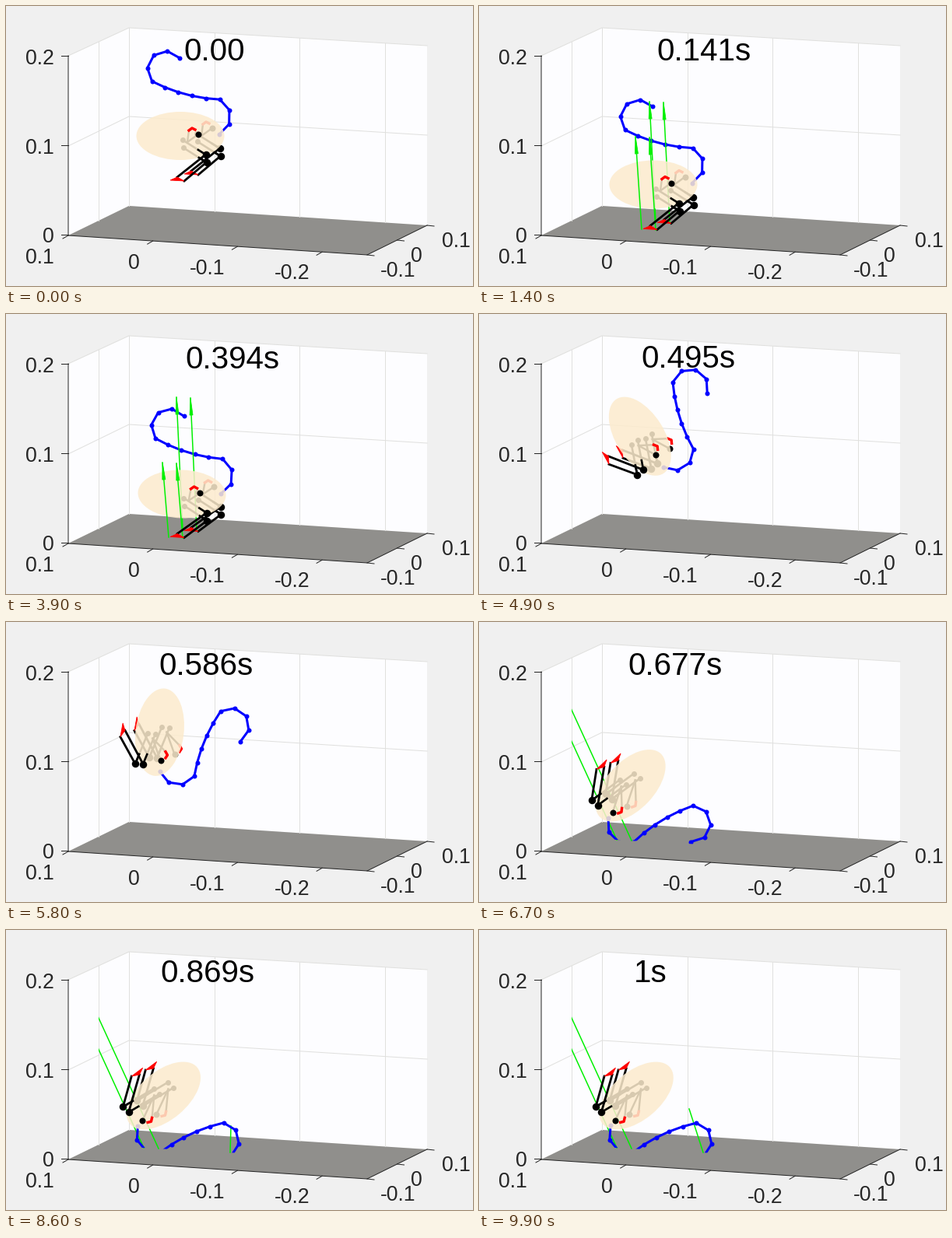
These frames come from a looping animation (600 by 360 pixels, 10000 ms). A matplotlib script:

```python
import numpy as np
import matplotlib.pyplot as plt
from matplotlib.animation import FuncAnimation
from matplotlib.patches import Ellipse, Polygon

W, H, DPI = 600, 360, 72
FRAMES = 100
PAPER, WALL, FLOOR = "#f0f0f0", "#fdfdff", "#908f8c"
GRID, INK, SKIN, FORCE = "#e0e0de", "#262626", "#fcebcd", "#00f000"

LAND, PUSH, LEAP, CRASH = 11, 39, 44, 66   # phases of the jump
GROUND = np.array([221, 285.5])            # planted near foot
FAR = np.array([18, -8])                   # far limbs seen from the camera

fig = plt.figure(figsize=(W / DPI, H / DPI), dpi=DPI, facecolor=PAPER)
ax = fig.add_axes([0, 0, 1, 1])
ax.set_xlim(0, W)
ax.set_ylim(H, 0)
ax.axis("off")


def label(x, y, s, size=26.6, ha="right", color=INK):
    return ax.text(x, y, s, fontsize=size, family="Liberation Sans",
                   color=color, ha=ha, va="baseline", zorder=9)


def rule(pts, color=GRID):
    ax.plot(*zip(*pts), color=color, lw=1, zorder=2)


def tick(x, y, dx, dy):
    rule([(x, y), (x + dx, y + dy)], INK)


def draw_box():
    fl, bl, br, fr = (80, 295), (158, 257), (541, 282), (464, 320)
    tl, tb, tr = (80, 64), (158, 28), (541, 51)
    for pts, color in (((fl, bl, tb, tl), WALL), ((bl, br, tr, tb), WALL),
                       ((fl, bl, br, fr), FLOOR)):
        ax.add_patch(Polygon(pts, fc=color, ec="none", zorder=1))
    rule([tl, tb, tr])
    rule([tb, bl])
    rule([(80, 180), (158, 142), (541, 166)])
    rule([(119, 46), (119, 276)])
    for k in (1, 2, 3):
        x = 158 + 109.7 * k
        rule([(x, 28 + 6.6 * k), (x, 257 + 7.1 * k)])
    rule([tl, fl, fr, br], INK)
    for k, s in enumerate(("0.2", "0.1", "0")):
        tick(80, 64 + 115 * k, -9, 0)
        label(62, 75 + 114.5 * k, s)
    for k, s in enumerate(("0.1", "0", "-0.1", "-0.2")):
        tick(80 + 108.7 * k, 295 + 7.1 * k, -7, 4)
        label(61.5 + 109.8 * k, 331 + 6.8 * k, s)
    for k, s in enumerate(("-0.1", "0", "0.1")):
        tick(464 + 38.5 * k, 320 - 19 * k, 9, 1)
        label(481 + 39.3 * k, 348 - 19 * k, s, ha="left")


def ramp(i, start, end):
    return np.clip((i - start) / (end - start), 0, 1)


def rotate(pts, deg):
    a = np.radians(deg)
    c, s = np.cos(a), np.sin(a)
    return np.asarray(pts, float) @ np.array([[c, s], [-s, c]])


def angle(i):
    """Slow lean, quick push, steady spin, then settling."""
    if i < LEAP:
        return 2 * ramp(i, 14, PUSH) + 34 * ramp(i, PUSH, LEAP) ** 2
    if i < CRASH:
        return 36 + 96 * ramp(i, LEAP, CRASH)
    return 140 - 8 * np.exp(-(i - CRASH) / 5)


def center(i):
    """Free fall, crouch and push, ballistic arc, then rest."""
    push = ramp(i, PUSH, LEAP) ** 2
    x = 224 + 2 * ramp(i, 14, PUSH) - 9 * push
    y = min(167 + 0.575 * i * i, 229.5) + 2 * ramp(i, 14, PUSH) - 26 * push
    if i >= LEAP:
        x = 191 + 26 * np.exp((LEAP - i) / 10) + 11 * ramp(i, CRASH, 76)
        y = min(136.5 + 0.575 * (i - 55) ** 2, 210 + 3 * ramp(i, CRASH, 76))
    return np.array([x, y])


def tail(c, a, u):
    """Chain of equal links: hook, long gentle run, curl."""
    turns = [-46] + [-43] * 3 + [5] * 4 + [46] * 4
    heading = np.radians(np.cumsum(turns) + a)
    links = 18.2 * np.column_stack([np.cos(heading), np.sin(heading)])
    base = c + rotate((50, -2 - 6 * u), a)
    return np.vstack([base, base + np.cumsum(links, axis=0)])


draw_box()
above_floor = Polygon([(0, 0), (W, 0), (W, 303.3), (0, 270.3)], transform=ax.transData)
in_box = Polygon([(119, 0), (W, 0), (W, H), (119, H)], transform=ax.transData)
live = []


def line(pts, color, lw, z, clip=None, **kw):
    art, = ax.plot(*zip(*pts), color=color, lw=lw, zorder=z, **kw)
    if clip is not None:
        art.set_clip_path(clip)
    live.append(art)


def dot(p, size, z):
    line([p], "black", 0, z, marker="o", ms=size, mew=0)


def shape(pts, color, z, clip=None):
    art = ax.add_patch(Polygon(pts, fc=color, ec=color, lw=0.8, zorder=z))
    if clip is not None:
        art.set_clip_path(clip)
    live.append(art)


def arrow(base, vec, z):
    base, vec = np.array(base, float), np.array(vec, float)
    tip, d = base + vec, vec / np.hypot(*vec)
    side = np.array([-d[1], d[0]]) * 2
    neck = tip - d * 22
    line([base, tip], FORCE, 1.5, z, in_box)
    shape([tip, neck + side, neck - side], FORCE, z, in_box)


def draw_leg(i, c, a, u, z):
    hip = c + rotate((3, 10), a)
    knee = c + rotate((33 + 15 * u, 29 - 11 * u), a)
    foot = c + rotate((-3 + 10 * u, 56 - 12 * u), a)
    # Feet stay on the ground until just after lift-off
    grip = (1 - ramp(i, LEAP, LEAP + 3)) * (i >= LAND)
    pull = grip * (GROUND + (c - center(i)) - foot)
    foot, knee = foot + pull, knee + pull / 2
    sole = foot + rotate([(-10, 1), (-1, -3), (8, 2)], a * (1 - grip))
    gap = rotate((0.5, 5), a)
    for side, ankle in ((-gap, sole[1]), (gap, sole[2])):
        h, k = hip + side, knee + side
        line([h, k], "black", 2.6, 4)
        line([k * 0.68 + h * 0.32, k], "black", 2.6, z)
        line([k, ankle], "black", 2.8, z)
        dot(h, 7, 4)
        dot(k, 9.5, z)
    shape(sole, "red", z + 0.1)


def draw_arm(c, a, u, z):
    reach = np.array([18, -5]) * u
    shoulder = c + rotate((9, 8), a)
    elbow = c + rotate(reach + (23, -2), a)
    hand = c + rotate(reach + [(11, -7), (15, -10), (19, -8)], a)
    line([shoulder, elbow], "black", 2.4, 4)
    line([shoulder, hand[0]], "black", 2.4, 4)
    line(hand, "red", 3.4, z)
    dot(elbow, 8, z)


def draw_forces(i):
    if LAND <= i <= LEAP:
        s = ramp(i, 14, PUSH)
        lean = 8 + 87 * ramp(i, PUSH, LEAP) ** 2
        for x, y in ((209, 287), (227, 288)):
            arrow((x, y), (-lean, 23 * s - 119), 5.5)
            arrow((x + 18, y - 10), (-lean, -154 - 16 * s), 3.5)
    if i >= CRASH:
        for x, y in ((196, 281), (177, 280)):
            line([(x, y), (x - 100, y - 218)], FORCE, 1.5, 2.5, in_box)
    if i >= 80:
        s = ramp(i, 86, 99)
        line([(288, 286), (289 - 19 * s, 252 - 22 * s)], FORCE, 1.5, 2.5)


def draw(i):
    while live:
        live.pop().remove()
    c, a = center(i), angle(i)
    u = a / 135
    line(tail(c, a, u), "blue", 3, 3, above_floor, marker="o", ms=6, mew=0)
    live.append(ax.add_patch(Ellipse(c, 113, 62, angle=a, fc=SKIN, ec="none",
                                     alpha=0.86, zorder=5)))
    for shift, z in ((FAR, 4), (0 * FAR, 6)):
        draw_leg(i, c + shift, a, u, z)
        draw_arm(c + shift, a, u, z)
    draw_forces(i)
    clock = f"{i / (FRAMES - 1):.3g}s" if i else "0.00"
    live.append(label(c[0] + 4.7 - 8 * u, 70 - 2.5 * u, clock, 40.4, "left", "black"))
    return live


anim = FuncAnimation(fig, draw, frames=FRAMES, interval=100, repeat=True, blit=False)
plt.show()
```
